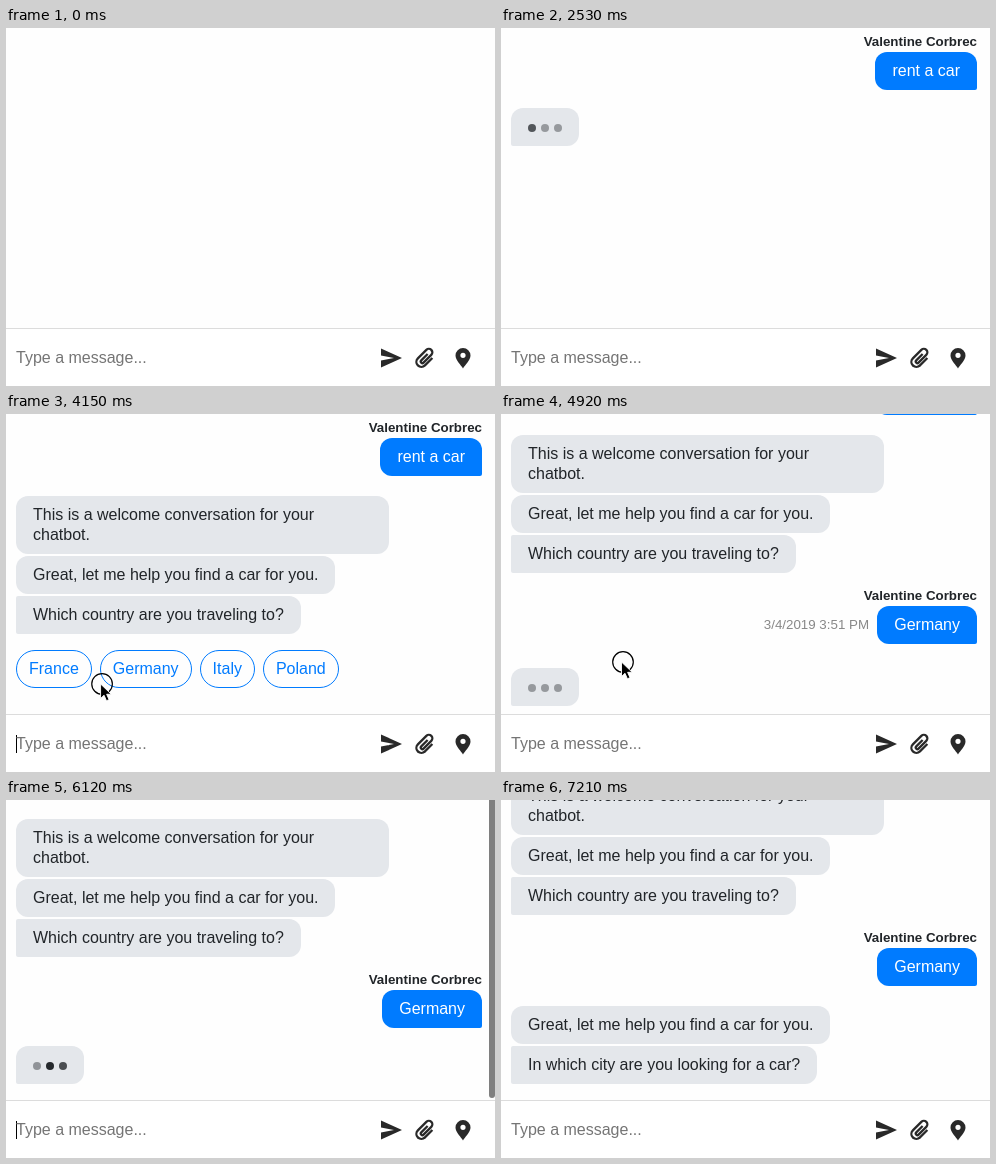
These frames come from a looping animation (489 by 358 pixels, 7.31 s). An HTML page:

```html
<!DOCTYPE html>
<html lang="en">
<head>
<meta charset="utf-8">
<title>Chat</title>
<style>
html, body { margin: 0; width: 100%; height: 100%; overflow: hidden; }
body { position: relative; background: #fefefe; color: #212529; font: 16px/20px "Liberation Sans", Arial, sans-serif; }
#view { position: absolute; inset: 0 0 auto; height: 300px; overflow: hidden; }
#log { position: absolute; top: 0; left: 0; width: 489px; }
#log > * { position: absolute; left: 10px; white-space: nowrap; box-sizing: border-box; }
.bubble { padding: 9px 17px; border-radius: 12px; background: #e4e7eb; }
.last { border-radius: 2px 12px 12px 2px; }
#log .user { left: auto; right: 13px; border-radius: 12px 12px 2px 12px; background: #007bff; color: #fff; }
#log .name { left: auto; right: 13px; font-size: 13.33px; font-weight: bold; }
#log .time { left: auto; right: 121px; font-size: 13.33px; color: #888; }
.typing { width: 68px; height: 38px; border-radius: 12px 12px 12px 2px; }
.typing i { position: absolute; top: 16px; width: 8px; height: 8px; border-radius: 50%; background: #212529; }
.chips { display: flex; gap: 8px; }
.chips span { padding: 8px 12px; border: 1px solid #007bff; border-radius: 19px; color: #007bff; }
.chips .hover { background: #007bff; color: #fff; }
#bar { position: absolute; right: 0; top: -3px; width: 6px; height: 301px; border-radius: 3px; background: #7f7f7f; }
#input { position: absolute; top: 300px; left: 0; right: 0; height: 58px; box-sizing: border-box; border-top: 1px solid #dcdcdc; background: #fff; }
#line { position: absolute; left: 10px; top: 19px; white-space: pre; }
#caret { display: inline-block; width: 1px; height: 18px; margin-right: -1px; vertical-align: -4px; background: #000; }
#hint { color: #757575; }
svg { position: absolute; left: 0; top: 0; overflow: visible; }
</style>
</head>
<body>
<div id="view">
  <div id="log">
    <div class="name" style="top:4px" data-from="2060">Valentine Corbrec</div>
    <div class="bubble user" style="top:24px" data-from="2060">rent a car</div>
    <div class="bubble typing" style="top:80px" data-from="2060" data-to="3560"></div>
    <div class="bubble" style="top:82px;width:373px" data-from="3560">This is a welcome conversation for your<br>chatbot.</div>
    <div class="bubble" style="top:142px" data-from="3560">Great, let me help you find a car for you.</div>
    <div class="bubble last" style="top:182px" data-from="3560">Which country are you traveling to?</div>
    <div class="chips" style="top:236px" data-from="3560" data-to="4920"><span>France</span><span id="pick">Germany</span><span>Italy</span><span>Poland</span></div>
    <div class="name" style="top:233px" data-from="4920">Valentine Corbrec</div>
    <div class="time" style="top:262px" data-from="4920" data-to="5230">3/4/2019 3:51 PM</div>
    <div class="bubble user" style="top:253px" data-from="4920">Germany</div>
    <div class="bubble typing" id="reply" data-from="4920" data-to="6290"></div>
    <div class="bubble" style="top:311px" data-from="6290">Great, let me help you find a car for you.</div>
    <div class="bubble last" style="top:351px" data-from="6290">In which city are you looking for a car?</div>
  </div>
  <div id="bar"></div>
</div>
<div id="input">
  <div id="line"><span id="typed"></span><i id="caret"></i><span id="hint">Type a message...</span></div>
</div>
<svg width="489" height="358" fill="#292929">
  <path d="M375 320.5 396 330 375 339.5V332.5L388 330 375 327.5Z"/>
  <path transform="translate(419.3 330) rotate(45)" fill="none" stroke="#292929" stroke-width="2.3" d="M5-5V5.5A5 5 0 0 1-5 5.5V-6.5A3.5 3.5 0 0 1 2-6.5V4.5A1.2 1.2 0 0 1-1.2 4.5V-4.5"/>
  <path fill-rule="evenodd" d="M457 340.5C455 337 449.5 332 449.5 327.5a7.5 7.5 0 0 1 15 0C464.5 332 459 337 457 340.5ZM454.4 327.3a2.6 2.6 0 1 0 5.2 0a2.6 2.6 0 1 0-5.2 0Z"/>
  <g id="mouse">
    <circle r="10.3" fill="none" stroke="#000" stroke-width="1.2"/>
    <path fill="#000" stroke="#fff" stroke-width=".9" d="M-1.5 0V14.5L2 11.3 4.4 16.8 7 15.7 4.6 10.3H9.2Z"/>
  </g>
</svg>
<script>
const LOOP = 7310;
const $ = id => document.getElementById(id);
const timed = [...document.querySelectorAll('[data-from]')];
const typings = [...document.querySelectorAll('.typing')];
const message = 'rent a car';
// time at which each number of letters is reached
const keys = [[530, 2], [710, 3], [800, 4], [880, 5], [1060, 6], [1110, 7], [1410, 8], [1530, 9], [1650, 10], [2060, 0]];
const path = [[2420, 156, 376], [3150, 149, 360.5], [3910, 149, 360.5], [4150, 96, 270], [4560, 122, 248], [5090, 122, 248], [5540, 15, 374]];

for (const box of typings)
  for (let n = 0; n < 3; n++) {
    const dot = box.appendChild(document.createElement('i'));
    dot.style.left = 17 + 13 * n + 'px';
  }

// the CSS "ease" curve
function ease(x) {
  let lo = 0, hi = 1, u;
  const bezier = (a, b) => 3 * u * (1 - u) ** 2 * a + 3 * u * u * (1 - u) * b + u ** 3;
  for (let i = 0; i < 16; i++) {
    u = (lo + hi) / 2;
    if (bezier(.25, .25) < x) lo = u; else hi = u;
  }
  return bezier(.1, 1);
}

function blink(age) {
  if (age < 0) return .4;
  const p = age % 1000 / 500;
  return p < 1 ? .4 + .6 * ease(p) : 1 - .6 * ease(p - 1);
}

function mouseAt(t) {
  const i = path.findIndex(p => p[0] > t);
  if (i < 1) return path.at(i).slice(1);
  const [a, b] = [path[i - 1], path[i]];
  const k = (t - a[0]) / (b[0] - a[0]);
  return [1, 2].map(n => a[n] + (b[n] - a[n]) * k);
}

function draw() {
  const t = performance.now() % LOOP;

  for (const el of timed) {
    const { from, to = LOOP } = el.dataset;
    el.style.visibility = t >= +from && t < +to ? 'visible' : 'hidden';
  }
  typings.forEach((box, n) => [...box.children].forEach((dot, i) => {
    dot.style.opacity = blink(t - [2030, 4930][n] - (i + 1) * 333.3);
  }));

  const scroll = t < 4920 ? 0 : t < 5230 ? 61 : t < 6290 ? 63 : 105;
  $('log').style.top = -scroll + 'px';
  $('reply').style.top = (t < 5230 ? 315 : 309) + 'px';
  $('bar').style.opacity = t < 5230 || t >= 6990 ? 0 : t < 6880 ? 1 : t < 6935 ? .66 : .33;

  const count = keys.reduce((n, [at, len]) => t >= at ? len : n, 0);
  $('typed').textContent = message.slice(0, count);
  $('hint').hidden = count > 0;
  const caretOn = t < 2060 ? t >= 50 : t < 7210 && (t - 1970) % 1000 < 500;
  $('caret').style.opacity = +caretOn;

  $('pick').className = t >= 4190 ? 'hover' : '';
  $('mouse').setAttribute('transform', `translate(${t < 2420 ? [156, 376] : mouseAt(t)})`);
  $('mouse').style.display = t < 2420 || t > 5540 ? 'none' : '';
  requestAnimationFrame(draw);
}
draw();
</script>
</body>
</html>
```
